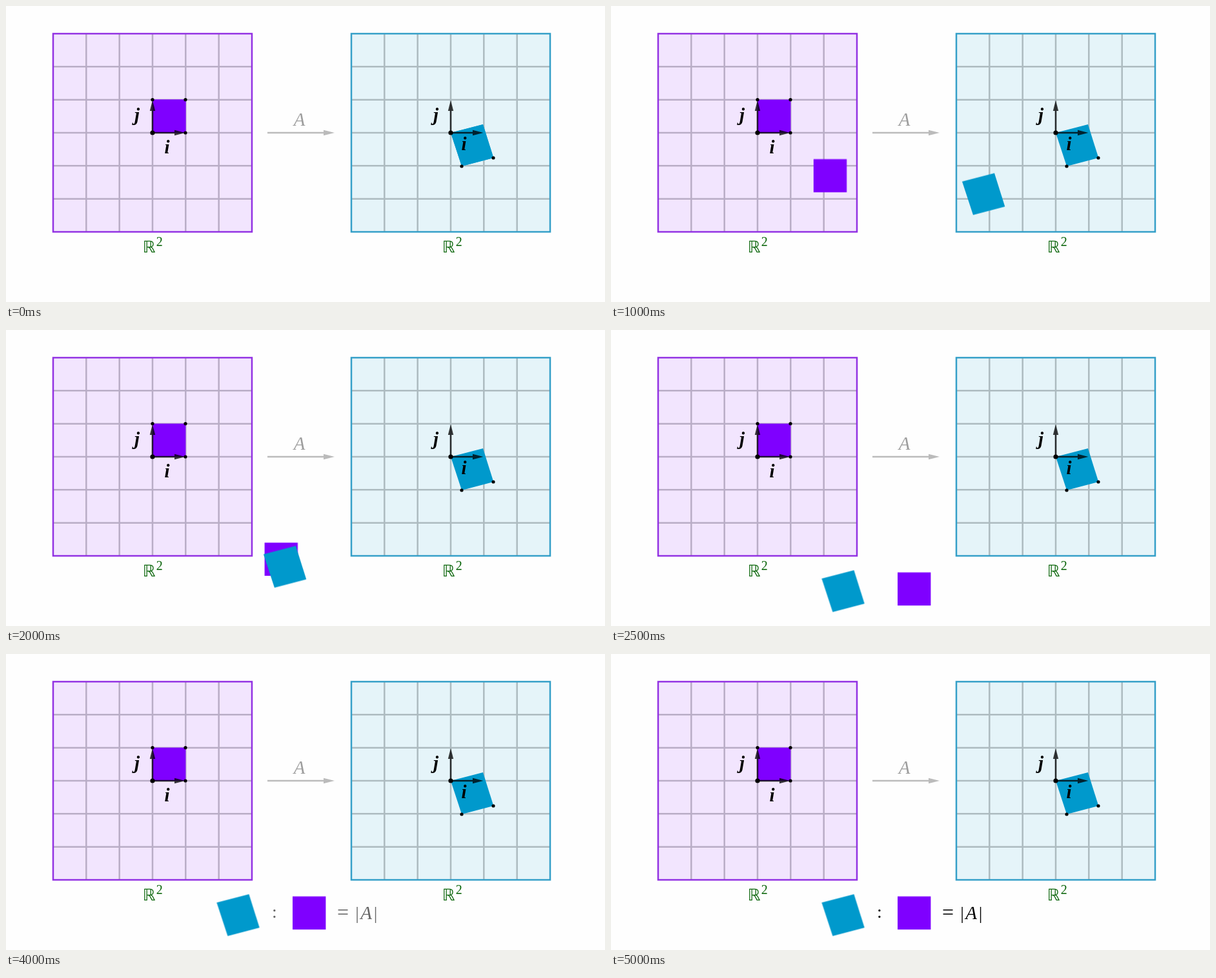
These frames come from a looping animation (928 by 460 pixels, 5.5 s). An HTML page:

```html
<!DOCTYPE html>
<html lang="en">
<head>
<meta charset="utf-8">
<title>Determinant as a ratio of areas</title>
<style>
  html, body { margin: 0; width: 100%; height: 100%; overflow: hidden; background: #fefefe; }
  svg { display: block; width: 928px; height: 460px; }
  text { font: 28px "Liberation Serif", serif; text-anchor: middle; }
  .grid { fill: none; stroke-width: 2.5; }
  .frame { stroke-width: 2.5; }
  .purple { fill: #7f00ff; }
  .blue { fill: #0099cc; }
  .var { font-style: italic; font-size: 29px; }
  .basis { font-style: italic; font-weight: bold; font-size: 29px; }
  .space { fill: #0a650a; }
  .space .set { font: 25px "DejaVu Sans", sans-serif; }
  .space .sup { font-size: 20px; }

  /* Eleven half-second poses: five of travel, five of fading in, one of rest. */
  .move { animation: move 5.5s infinite; }
  .purple.move { --to: translate(217px, 231.2px); }
  .blue.move { --to: translate(-362.6px, 189.3px); }
  .ratio { animation: show 5.5s infinite; }
  @keyframes move {
    0% { transform: translate(0, 0); animation-timing-function: steps(5, end); }
    45.4545%, 100% { transform: var(--to); }
  }
  @keyframes show {
    0%, 45.4545% { opacity: 0; animation-timing-function: steps(5, end); }
    90.909%, 100% { opacity: 1; }
  }
</style>
</head>
<body>
<svg viewBox="0 0 928 460">
  <defs>
    <path id="lines" d="M51.3 0v308M102.7 0v308M154 0v308M205.3 0v308M256.7 0v308
      M0 51.3h308M0 102.7h308M0 154h308M0 205.3h308M0 256.7h308"/>
    <g id="vector">
      <path d="M0 0H35" stroke="#000" stroke-width="2.5"/>
      <path d="M34 -4.2L50.5 0L34 4.2z"/>
    </g>
    <g id="axes">
      <g opacity=".77">
        <use href="#vector"/>
        <use href="#vector" transform="rotate(-90)"/>
      </g>
      <circle r="3.6"/>
    </g>
    <path id="unit" d="M0 0H51.4V-51.4H0z"/>
    <path id="image" d="M0 0L50 -13L66.3 39L17 52z"/>
    <g id="plane" class="space">
      <text class="set" x="221.5" y="383">ℝ</text>
      <text class="sup" x="237.7" y="372.5">2</text>
    </g>
  </defs>

  <g transform="translate(73 43)">
    <rect width="308" height="308" fill="#f2e5fe"/>
    <use href="#lines" class="grid" stroke="#b9adc6"/>
    <rect class="frame" width="308" height="308" fill="none" stroke="#9232e3"/>
  </g>
  <g transform="translate(535 43)">
    <rect width="308" height="308" fill="#e5f4f9"/>
    <use href="#lines" class="grid" stroke="#adbbc0"/>
    <rect class="frame" width="308" height="308" fill="none" stroke="#349fc8"/>
  </g>
  <use href="#plane"/>
  <use href="#plane" x="464"/>

  <use href="#unit" class="purple" x="227" y="197"/>
  <use href="#image" class="blue" x="689" y="197"/>
  <g class="purple move"><use href="#unit" x="227" y="197"/></g>
  <g class="blue move"><use href="#image" x="689" y="197"/></g>

  <use href="#axes" x="227" y="197"/>
  <use href="#axes" x="689" y="197"/>
  <circle cx="227" cy="145.6" r="2.6"/>
  <circle cx="278" cy="145.6" r="2.6"/>
  <circle cx="278" cy="197" r="2.6"/>
  <circle cx="755" cy="236" r="2.6"/>
  <circle cx="706" cy="249" r="2.6"/>

  <g class="basis-labels">
    <text class="basis" x="203" y="179">j</text>
    <text class="basis" x="249.5" y="229">i</text>
    <text class="basis" x="666" y="179">j</text>
    <text class="basis" x="709.5" y="224">i</text>
  </g>

  <g fill="#bbb">
    <path d="M405 197H493" stroke="#bbb" stroke-width="2.5"/>
    <path d="M492 192.8L509 197L492 201.2z"/>
  </g>
  <text class="var" x="454.5" y="186" fill="#9d9d9d">A</text>

  <g class="ratio">
    <text x="416" y="409.5">:</text>
    <text x="522" y="412" style="font-size:32px">=</text>
    <text x="544" y="411.5">|</text>
    <text class="var" x="558" y="411.5">A</text>
    <text x="572.5" y="411.5">|</text>
  </g>
</svg>
</body>
</html>
```
